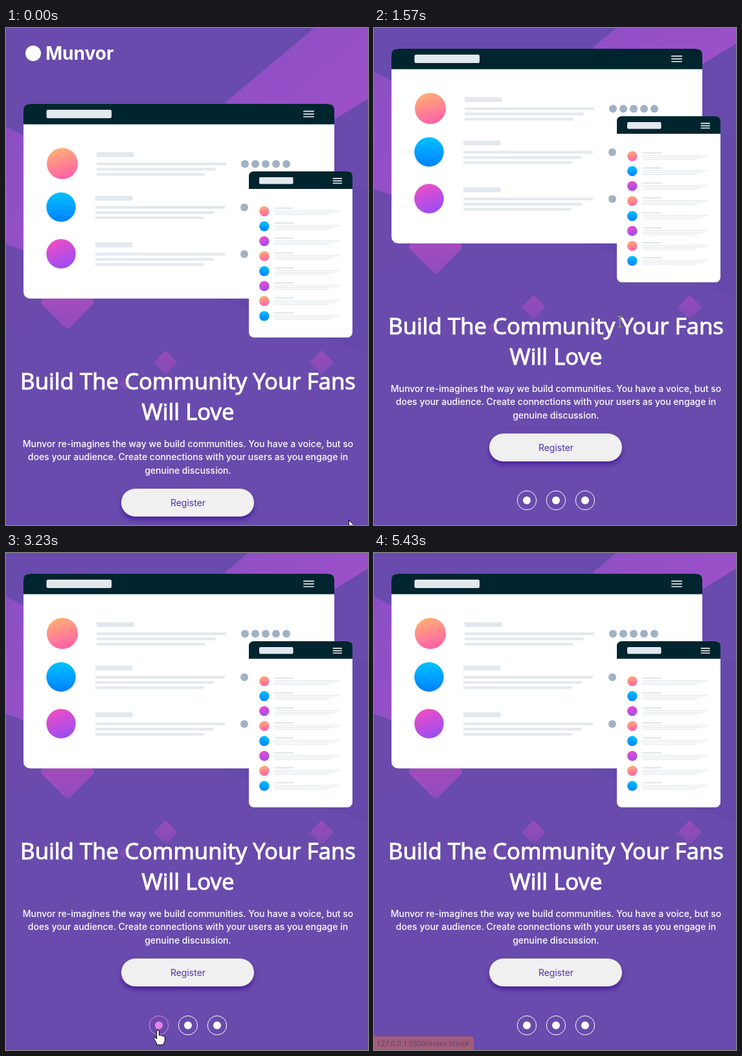
Recreate the animation shown at these times as an HTML page. Size 559 by 766 pixels, loop 5.49 s.

```html
<!DOCTYPE html>
<html lang="en">
<head>
<meta charset="utf-8">
<title>Build The Community Your Fans Will Love</title>
<style>
html, body { margin: 0; width: 100%; height: 100%; overflow: hidden; background: #684bac; }
svg { display: block; width: 559px; height: 766px; }
.copy { font: 500 14px Inter, sans-serif; fill: #fff; text-anchor: middle; }
.head { font: 400 34.8px "Open Sans", sans-serif; fill: #fff; stroke: #fff; stroke-width: 1.1; text-anchor: middle; }
.label { font: 400 14px Inter, sans-serif; fill: #5330a8; text-anchor: middle; }
.logo { font: 700 28px Inter, sans-serif; fill: #fff; }
.url { font: 400 11.2px "Open Sans", sans-serif; fill: #4a2a1c; }
</style>
</head>
<body>
<svg viewBox="0 0 559 766" xmlns="http://www.w3.org/2000/svg">
  <defs>
    <linearGradient id="orange" x2=".3" y2="1"><stop stop-color="#ffb66d"/><stop offset="1" stop-color="#ff66a6"/></linearGradient>
    <linearGradient id="blue" x2="0" y2="1"><stop stop-color="#00c2ff"/><stop offset="1" stop-color="#0080ff"/></linearGradient>
    <linearGradient id="pink" x2=".4" y2="1"><stop stop-color="#f74fbe"/><stop offset="1" stop-color="#a04df2"/></linearGradient>
    <linearGradient id="gem" x2="1" y2="1"><stop stop-color="#b04cc0"/><stop offset="1" stop-color="#904cba"/></linearGradient>
    <linearGradient id="slab" x2="1" y2="1"><stop stop-color="#8a4fc4"/><stop offset="1" stop-color="#a050cb"/></linearGradient>
    <filter id="soft" x="-20%" y="-50%" width="140%" height="220%"><feGaussianBlur stdDeviation="3"/></filter>
  </defs>
  <rect width="559" height="766" fill="#684bac"/>
  <g id="page">
    <path d="M476 0H559V109L440 182 338 115Z" fill="url(#slab)"/>
    <path d="M0 152L120 214V376L0 333Z" fill="url(#slab)"/>
    <path d="M0 333L120 376V413L0 461Z" fill="#7a45ae" opacity=".18"/>
    <path d="M310 410L559 502V250H310Z" fill="#54409f" opacity=".18"/>
    <g id="gems"></g>
    <circle cx="42" cy="39" r="12" fill="#fff"/>
    <text class="logo" x="61" y="49">Munvor</text>
    <g id="desktop"></g>
    <g id="phone"></g>
    <text class="head" x="281" y="557">Build The Community Your Fans</text>
    <text class="head" x="281" y="604">Will Love</text>
    <text class="copy" x="281" y="646">Munvor re-imagines the way we build communities. You have a voice, but so</text>
    <text class="copy" x="281" y="666">does your audience. Create connections with your users as you engage in</text>
    <text class="copy" x="281" y="687">genuine discussion.</text>
    <rect x="178" y="715" width="205" height="43" rx="21.5" fill="#43139a" opacity=".75" filter="url(#soft)"/>
    <rect x="178" y="710" width="205" height="43" rx="21.5" fill="#f0f0f0"/>
    <text class="label" x="281" y="737">Register</text>
    <g id="icons"></g>
  </g>
  <g id="bar">
    <path d="M0 745H150Q154 745 154 749V766H0Z" fill="#fa7a2c"/>
    <text class="url" x="4" y="760">127.0.0.1:5500/index.html#</text>
  </g>
  <g id="cursor">
    <path id="arrow" d="M0 0V17L4 13.2 6.8 19.2 9.4 18 6.7 12.2H12Z" fill="#fff" stroke="#000"/>
    <path id="hand" d="M-2 1.5Q0 -1 2 1.5V8Q4 6.8 5.5 8.5 7.5 7.6 8.5 9.4 10.6 9 11 11V15Q11 18 9 20V22.5H-2V20L-6 13.5Q-7 11 -4.5 11L-2 13.5Z" fill="#fff" stroke="#000"/>
    <path id="beam" d="M-3.5 -8H3.5M0 -8V8M-3.5 8H3.5" fill="none" stroke="#98b450" stroke-width="1.2"/>
  </g>
</svg>
<script>
const LOOP = 5490, STEP = 66, SCROLL = 85, ICON_Y = 813;
const LINE = "#e1e8ee", DOT = "#a1b1c3", DARK = "#00252e";
const hues = ["url(#orange)", "url(#blue)", "url(#pink)"];
const $ = id => document.getElementById(id);
const repeat = (n, f) => Array.from({ length: n }, (_, i) => f(i)).join("");

const rect = (x, y, w, h, fill, r = 0) =>
  `<rect x="${x}" y="${y}" width="${w}" height="${h}" rx="${r}" fill="${fill}"/>`;
const disc = (x, y, r, fill) => `<circle cx="${x}" cy="${y}" r="${r}" fill="${fill}"/>`;
const burger = (x, y, w, gap) => repeat(3, i => rect(x, y + i * gap, w, 1.7, "#e9edf0", .8));

// White panel with a dark title strip
const panel = (x, y, w, h, strip, r) => rect(x, y, w, h, "#fff", r) +
  `<path d="M${x} ${y + strip}V${y + r}q0 ${-r} ${r} ${-r}H${x + w - r}q${r} 0 ${r} ${r}V${y + strip}Z" fill="${DARK}"/>`;

// Rotated square; smaller ones are fainter
const gem = (x, y, half) => {
  const a = half * 1.43;
  return `<g transform="translate(${x} ${y}) rotate(45)" opacity="${Math.sqrt(half / 43)}">` +
    rect(-a / 2, -a / 2, a, a, "url(#gem)", a / 12) + "</g>";
};

function post(i) {
  const y = 209 + 64.5 * i + 2.5 * i * i, x = i ? 138 : 140;
  return disc(i ? 85 : 87, y, i ? 22.7 : 24, hues[i]) + rect(x, y - 17.5, 57.5, 7.5, LINE, 1) +
    repeat(3, k => rect(x, y - 1.5 + k * 8, 200 - 16.5 * k, 4, LINE, 1)) +
    repeat(i ? 1 : 5, k => disc((i ? 368 : 369) + k * 16, y + .5, 6, DOT));
}

function smallPost(i) {
  const y = 282.5 + i * 23.05, x = 414.5;
  return disc(398.8, y, 7.7, hues[i % 3]) + rect(x, y - 6, 29.5, 2.4, LINE) +
    repeat(3, k => rect(x, y - 1.2 + k * 2.8, 101 - 8.5 * k, 1.2, LINE));
}

const iconX = i => 236 + 45 * i;
const icon = i => `<g><circle cx="${iconX(i)}" cy="${ICON_Y}" r="14.7" fill="none" stroke="currentColor"/>` +
  disc(iconX(i), ICON_Y, 6, "currentColor") + "</g>";

$("gems").innerHTML = gem(95, 422, 43) + gem(246.5, 515.5, 18.5) + gem(487.5, 515.5, 18.5) + gem(183, 548, 8.5);
$("desktop").innerHTML = panel(27, 117, 480, 300, 31.5, 10) + rect(62.5, 126, 100.5, 13, LINE, 2.5) +
  burger(459, 127.5, 17, 4.2) + repeat(3, post);
$("phone").innerHTML = panel(375, 221, 160, 256, 27, 8) + rect(391, 230, 52.5, 10.5, LINE, 2) +
  burger(504.5, 231, 14.5, 3.7) + repeat(8, smallPost);
$("icons").innerHTML = repeat(3, icon);

const ramp = (t, a, b) => Math.max(0, Math.min(1, (t - a) / (b - a)));
const ease = p => p * p * (3 - 2 * p);
// The screen refreshes every STEP ms
const snap = t => Math.max(0, Math.floor((t - 30) / STEP) * STEP + 32);

// Pointer moves: start, end, x, y
const moves = [[32, 560, 381, 413], [1374, 1940, 372, 584], [2634, 3200, 234, 735],
  [3554, 3880, 284, 731], [4124, 4480, 328, 734], [4834, 5300, 340, 800]];

function pointer(t) {
  let x = 529, y = 758;
  for (const [a, b, toX, toY] of moves) {
    const p = ease(ramp(t, a, b));
    x += (toX - x) * p;
    y += (toY - y) * p;
  }
  return [Math.round(x), Math.round(y)];
}

const within = (v, a, b) => v > a && v < b;
function shape(x, y, icon) {
  if (icon >= 0 || within(x, 178, 383) && within(y, 710, 753)) return "hand";
  return within(x, 24, 538) && (within(y, 522, 612) || within(y, 632, 694)) ? "beam" : "arrow";
}

function draw(t) {
  const u = snap(t);
  const scroll = Math.round(SCROLL * ease(ramp(u, 1098, 1276)));
  const [x, y] = pointer(u);
  const over = [0, 1, 2].findIndex(i => Math.hypot(x - iconX(i), y + scroll - ICON_Y) < 15);
  const kind = shape(x, y + scroll, over);
  $("page").setAttribute("transform", `translate(0 ${-scroll})`);
  [...$("icons").children].forEach((g, i) => g.setAttribute("color", i === over ? "#e882e8" : "#fff"));
  $("bar").setAttribute("opacity", ramp(t, 3300, 3430) * (1 - ramp(t, 5364, 5474)));
  $("cursor").setAttribute("transform", `translate(${x + .5} ${y + .5})`);
  for (const id of ["arrow", "hand", "beam"]) $(id).setAttribute("display", id === kind ? "inline" : "none");
}

const start = performance.now();
function tick() {
  draw((performance.now() - start) % LOOP);
  requestAnimationFrame(tick);
}
tick();
</script>
</body>
</html>
```
